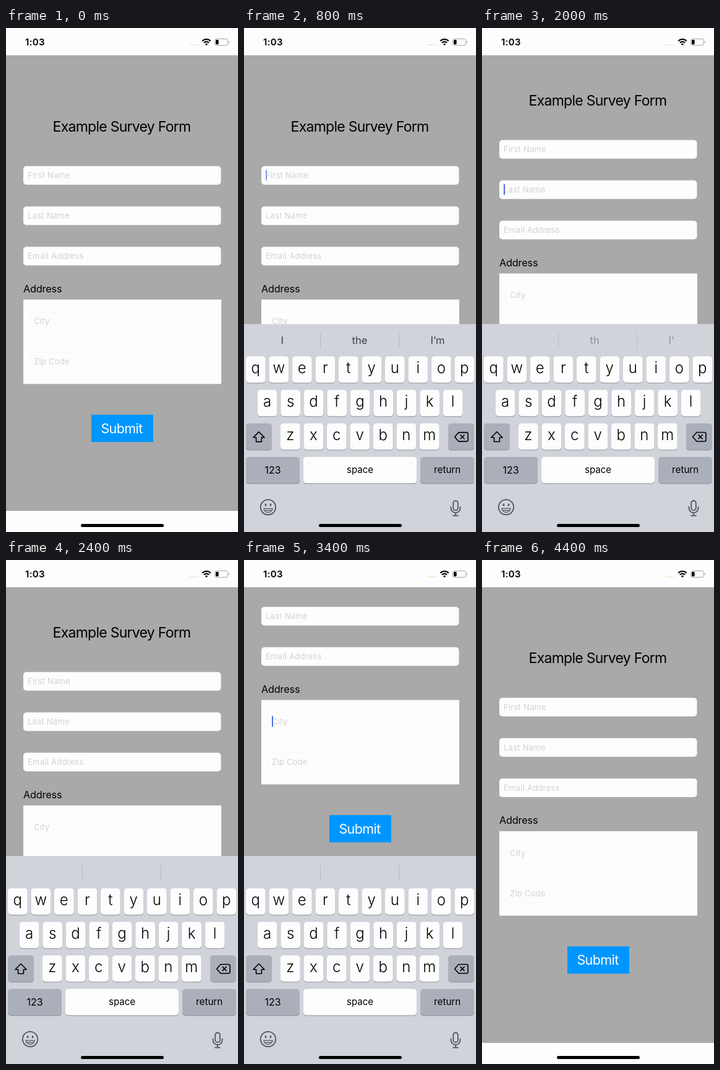
Animation, 375 px wide and 812 px high, one loop 4500 ms. Source, as an HTML page:

```html
<!DOCTYPE html>
<html lang="en">
<head>
<meta charset="utf-8">
<title>Survey form</title>
<style>
  html, body { margin: 0; width: 100%; height: 100%; overflow: hidden; background: #fdfdfe; }
  svg { display: block; font-family: Inter, "Liberation Sans", sans-serif; font-optical-sizing: none; }
  .mid { text-anchor: middle; }
  .hint { font-size: 13px; letter-spacing: .25px; fill: #d2d2d2; }
  .letter { font-size: 24px; font-weight: 300; }
  .word { font-size: 16.5px; fill: #3c3c42; }
  .line { fill: none; stroke: #000; stroke-width: 1.6; stroke-linejoin: round; stroke-linecap: round; }
  .icon { fill: none; stroke: #50555c; stroke-width: 1.8; stroke-linecap: round; }
</style>
</head>
<body>
<svg width="375" height="812" viewBox="0 0 375 812">
  <rect width="375" height="812" fill="#fdfdfe"/>
  <rect y="44" width="375" height="734" fill="#a9a9a9"/>

  <g id="form">
    <text class="mid" x="187" y="167" font-size="23" letter-spacing="-.73">Example Survey Form</text>
    <text x="28" y="426" font-size="16.3" letter-spacing="-.2">Address</text>
    <rect x="28" y="437.5" width="320" height="136" fill="#fdfdfe"/>
    <g id="fields"></g>
    <rect x="138" y="623" width="100" height="44" fill="#0096ff"/>
    <text class="mid" x="187" y="653" font-size="21.5" letter-spacing="-.6" fill="#fff">Submit</text>
    <rect id="caret" width="2" height="18" rx="1" fill="#4a6ee0"/>
  </g>

  <!-- status bar -->
  <rect width="375" height="44" fill="#fdfdfe"/>
  <rect y="778" width="375" height="34" fill="#fdfdfe"/>
  <text x="31" y="28.3" font-size="15" font-weight="600" letter-spacing=".3">1:03</text>
  <path d="M297 27h14" stroke="#e6e3b4" stroke-width="2" stroke-dasharray="2 2.2"/>
  <g fill="none" stroke="#000" stroke-width="2.2">
    <path d="M317.3 20.9a9.6 9.6 0 0 1 13.4 0M319.9 23.8a5.8 5.8 0 0 1 8.2 0"/>
    <path d="M324 28.3l-2.2-2.3a3.2 3.2 0 0 1 4.4 0z" fill="#000" stroke="none"/>
  </g>
  <rect x="337.5" y="17.5" width="21" height="10.5" rx="3" fill="none" stroke="#a3a3a3"/>
  <rect x="339" y="19" width="4.6" height="7.5" rx="1.4"/>
  <path d="M360 21v3.6q1.3-.5 1.3-1.8t-1.3-1.8z" fill="#a3a3a3"/>

  <g id="keyboard">
    <rect y="477" width="375" height="335" fill="#d1d3db"/>
    <path d="M123.5 491v25M250.5 491v25" stroke="#b9bcc5"/>
    <g id="words" class="word"></g>
    <g id="keys"></g>
    <path class="line" d="M24 650.5l9 9.2h-4.6v6.8h-8.8v-6.8H15z"/>
    <path class="line" d="M347 651.5h12.5q2.5 0 2.5 2.5v9.5q0 2.5-2.5 2.5H347l-6.5-7.3zM350 655.6l6 6m0-6l-6 6"/>
    <g class="icon">
      <circle cx="39" cy="772" r="12.2"/>
      <path d="M31.8 774.2h14.4a7.3 7.3 0 0 1-14.4 0zM33.5 777.3h11" stroke-width="1.2" stroke-linejoin="round"/>
      <path d="M35 767.5v1.4M43 767.5v1.4" stroke-width="2.6"/>
      <rect x="338.2" y="761.5" width="7.6" height="15.5" rx="3.8"/>
      <path d="M334.5 771.5v2a7.5 7.5 0 0 0 15 0v-2M342 781.2v4.3M338 785.6h8"/>
    </g>
  </g>
  <rect x="121" y="799" width="134" height="5" rx="2.5"/>
</svg>

<script>
const $ = id => document.getElementById(id);
const clamp = x => Math.min(1, Math.max(0, x));

// Form fields
const fields = [
  { label: 'First Name', x: 35, y: 237.5, box: true },
  { label: 'Last Name', x: 35, y: 302.5, box: true },
  { label: 'Email Address', x: 35, y: 367.5, box: true },
  { label: 'City', x: 45, y: 472.5 },
  { label: 'Zip Code', x: 45, y: 537.5 }
];
$('fields').innerHTML = fields.map(f =>
  (f.box
    ? `<rect x="28" y="${f.y - 15}" width="319.5" height="30" rx="5" fill="#fdfdfe"/>`
    : `<rect x="38.5" y="${f.y - 15}" width="298" height="30" rx="5" fill="none" stroke="#f8f8f6"/>`) +
  `<text class="hint" x="${f.x}" y="${f.y + 4.7}">${f.label}</text>`).join('');

// Keyboard
const key = (x, y, w, fill = '#fdfdfe') =>
  `<rect x="${x}" y="${y + 1}" width="${w}" height="42.5" rx="5" fill="#8b8d93"/>` +
  `<rect x="${x}" y="${y}" width="${w}" height="42.5" rx="5" fill="${fill}"/>`;
const label = (x, y, text, size) =>
  `<text class="mid" x="${x}" y="${y}" font-size="${size}">${text}</text>`;
const row = (letters, x0, y) => [...letters].map((c, i) => {
  const x = x0 + i * 37.5;
  return key(x, y, 31.7) + `<text class="mid letter" x="${x + 15.8}" y="${y + 27}">${c}</text>`;
}).join('');
const dark = '#abafba';
$('keys').innerHTML =
  row('qwertyuiop', 3, 529) + row('asdfghjkl', 21.8, 583) + row('zxcvbnm', 59, 637) +
  key(3, 637, 42, dark) + key(330, 637, 42, dark) +
  key(3, 691, 87, dark) + key(96, 691, 183) + key(285, 691, 87, dark) +
  label(46.5, 718, '123', 16) + label(187.5, 716.5, 'space', 15) + label(328.7, 717, 'return', 15.2);

const showWords = list => list.map((w, i) =>
  `<text x="${[59.5, 174.5, 301.5][i]}" y="509">${w}</text>`).join('');

// Timeline (ms): each focus scrolls its field to the middle of the visible area
const LOOP = 4500, MIDDLE = 260.5, SHOW = 225, HIDE = 3950, RESET = 4098;
const focusAt = [SHOW, 1690, 2676, 3060, 3580];
const stops = fields.map((f, i) => [focusAt[i], Math.max(0, f.y - MIDDLE)]);
stops.push([RESET, 0]);

const smooth = p => p * p * (3 - 2 * p);
const spring = ms => {
  const k = Math.max(0, ms) * .018;
  return 1 - (1 + k) * Math.exp(-k);
};

function scrollAt(t) {
  let y = 0;
  for (const [start, to] of stops) y += (to - y) * smooth(clamp((t - start) / 310));
  return y;
}

function caretAlpha(ms) {
  const p = ms % 1100;
  return p < 500 ? 1 : p < 900 ? clamp((700 - p) / 200) : (p - 900) / 200;
}

function draw(t) {
  $('form').setAttribute('transform', `translate(0 ${-scrollAt(t)})`);

  const active = focusAt.filter(start => t >= start).length - 1;
  const focused = active >= 0 && t < HIDE;
  $('caret').setAttribute('opacity', focused ? caretAlpha(t - focusAt[active]) : 0);
  if (focused) {
    $('caret').setAttribute('x', fields[active].x);
    $('caret').setAttribute('y', fields[active].y - 9.5);
  }

  const up = spring(t - SHOW) - spring(t - HIDE);
  $('keyboard').setAttribute('transform', `translate(0 ${Math.min(336, 340 * (1 - up))})`);
  $('words').innerHTML = showWords(t < 1900 ? ['I', 'the', 'I’m'] : t < 2200 ? ['', 'th', 'I’'] : []);
  $('words').setAttribute('opacity', t < 1900 ? 1 : .45);
}

const origin = performance.now();
function tick() {
  const t = Math.max(0, performance.now() - origin) % LOOP;
  draw(Math.floor(t / 100) * 100);
  requestAnimationFrame(tick);
}
tick();
</script>
</body>
</html>
```
